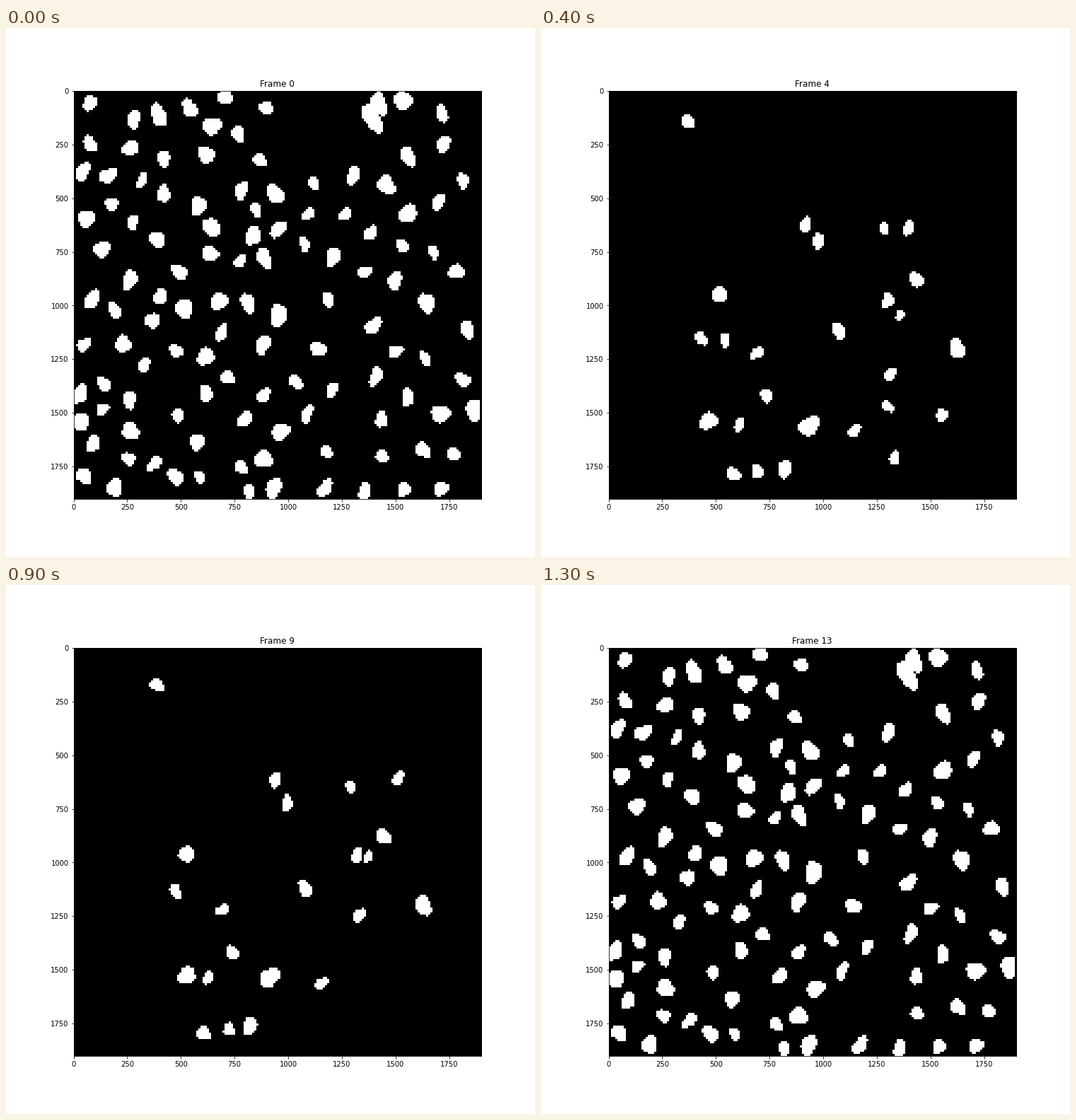
Animation of 748x748 px, one loop 1400 ms. Source, as a matplotlib script:

```python
import numpy as np
import matplotlib.pyplot as plt
from matplotlib.animation import FuncAnimation

SIZE, DPI = 748, 72
GRID, FRAMES = 190, 14
FIRST, LAST = 2, 12          # times of the start and end points of every path
ROWS, COLS = np.mgrid[:GRID, :GRID] + 0.5
rng = np.random.default_rng(7)

# Start point, drift and size of the cells that stay to the end, in grid units
paths = [
    (36, 13, 4, 6, 6), (91, 63, 4, -2, 6), (97, 69, 3, 5, 6), (128, 64, 1, 1, 5),
    (135, 65, 23, -6, 6), (143, 88, 2, 0, 7), (129, 98, 4, -2, 6), (135, 107, 3, -14, 4.5),
    (51, 94, 2, 3, 7), (41, 116, 9, -4, 6), (107, 112, 1, 0, 7), (130, 135, 4, -15, 6),
    (162, 120, 1, 0, 8), (73, 142, 1, 0, 6), (44, 154, 12, -2, 8), (94, 157, -4, -5, 9),
    (60, 156, 4, -4, 5.5), (114, 159, 2, -4, 6), (57, 178, 5, 2, 6), (68, 177, 6, 1, 5.5),
    (82, 176, 0, 0, 7),
]
# Cells that vanish on the way, by the last frame that shows them
departures = {
    2: [(49, 3), (57, 43), (90, 52), (71, 97), (126, 115), (84, 147), (146, 145)],
    5: [(155, 151)],
    6: [(54, 116), (130, 147), (133, 171)],
    11: [(69, 122)],
}
clump = [(138, 11), (142, 6), (140, 14)]


def random_shape(size):
    """Width, height, tilt and outline phase of a cell."""
    stretch = rng.uniform(0.9, 1.25)
    return size / stretch, size * stretch, rng.uniform(-0.5, 0.4), rng.uniform(0, 2 * np.pi)


def scatter(count):
    """Throw cells that keep apart, looser to the right, with a gap at the top."""
    points = [clump[0]]
    for x, y in rng.uniform(2, GRID - 3, (20000, 2)):
        spacing = 11 if x < GRID / 2 else 14
        in_gap = abs(x - 112) < 20 and y < 38
        distances = np.hypot(*(np.array(points) - (x, y)).T)
        if not in_gap and distances.min() > spacing:
            points.append((x, y))
        if len(points) == count:
            break
    return points[1:]


crowd = [(x, y, *random_shape(rng.uniform(5.5, 8.5))) for x, y in scatter(118)]
crowd += [(x, y, *random_shape(9)) for x, y in clump]

movers = [(x, y, dx, dy, LAST, random_shape(size)) for x, y, dx, dy, size in paths]
movers += [(x, y, 0, 0, end, random_shape(5.5))
           for end, points in departures.items() for x, y in points]


def visible_cells(n):
    if n in (0, FRAMES - 1):
        return crowd[2:] if n else crowd
    progress = (n - FIRST) / (LAST - FIRST)
    return [(x + dx * progress, y + dy * progress, w, h, tilt, phase + n)
            for x, y, dx, dy, end, (w, h, tilt, phase) in movers if n <= end]


def render(n):
    """Raster of slightly lumpy tilted ovals."""
    mask = np.zeros((GRID, GRID))
    for x, y, w, h, tilt, phase in visible_cells(n):
        u, v = (COLS - x) * 2 / w, (ROWS - y) * 2 / h
        reach = (1 - tilt ** 2) * (1.1 + 0.2 * np.sin(3 * np.arctan2(v, u) + phase))
        mask[u * u - 2 * tilt * u * v + v * v <= reach] = 1
    return mask


fig, ax = plt.subplots(figsize=(10.39, 10.39), dpi=DPI)
fig.subplots_adjust(left=95.5 / SIZE, right=672 / SIZE,
                    bottom=1 - 665.6 / SIZE, top=1 - 89.1 / SIZE)
image = ax.imshow(render(0), cmap="gray", vmin=0, vmax=1,
                  extent=(0, 1900, 1900, 0), interpolation="nearest")
ticks = range(0, 1900, 250)
ax.set_xticks(ticks)
ax.set_yticks(ticks)
title = ax.set_title("Frame 0")


def update(n):
    image.set_data(render(n))
    title.set_text(f"Frame {n}")
    return image, title


anim = FuncAnimation(fig, update, frames=FRAMES, interval=100, repeat=True, blit=False)
plt.show()
```
